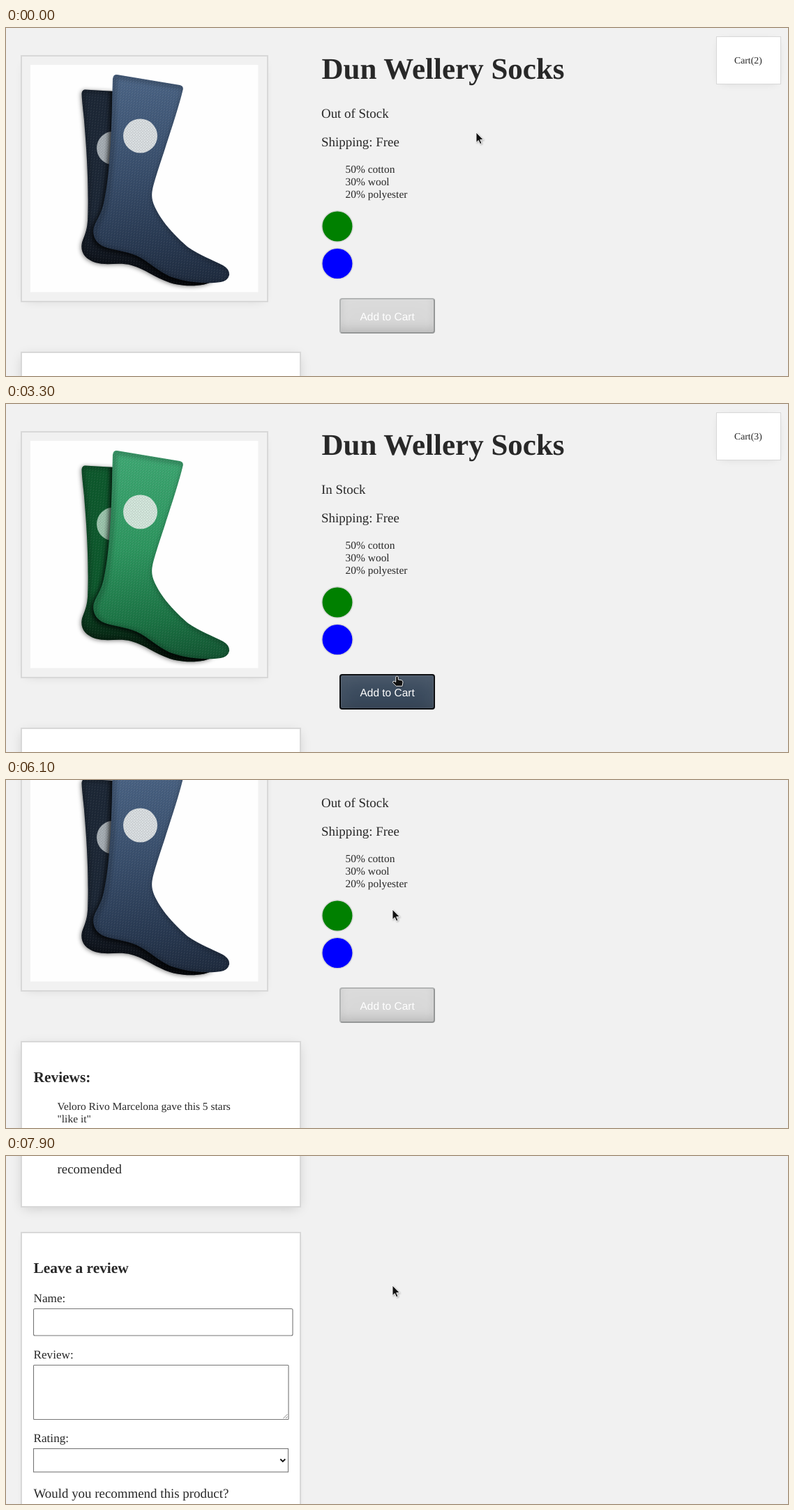
An HTML page that plays this animation: 1121 px wide and 500 px high, repeating every 8000 ms.

```html
<!DOCTYPE html>
<html lang="en">
<head>
<meta charset="utf-8">
<title>Sock shop</title>
<style>
  html, body { margin: 0; width: 100%; height: 100%; overflow: hidden; background: #f1f1f1; }
  #stage { position: relative; width: 1121px; height: 500px; overflow: hidden; background: #f1f1f1; }
  #page { position: absolute; left: 0; top: 0; width: 1121px; height: 1200px; }
  #page > * { position: absolute; box-sizing: border-box; }
  #art { left: 0; top: 0; }

  .card { background: #fff; border: 2px solid #d8d8d8; }
  .cart { left: 1018px; top: 12px; width: 93px; height: 69px; border-width: 1px; box-shadow: 0 2px 13px -7px rgba(0,0,0,.2); }
  .photo { left: 21px; top: 39px; width: 355px; height: 355px; background: #f1f1f1; box-shadow: 0 4px 14px -8px rgba(0,0,0,.16); }
  .reviews { left: 21px; top: 465px; width: 402px; height: 207px; box-shadow: 0 4px 17px -4px rgba(0,0,0,.18); }
  .form { left: 21px; top: 707px; width: 402px; height: 520px; box-shadow: 0 2px 10px -7px rgba(0,0,0,.3); }

  .button {
    left: 478px; top: 388px; width: 137px; height: 51px;
    border: 2px solid; border-radius: 4px; font-size: 15.48px;
    border-color: #b2b4b4 #959797 #959797 #b2b4b4; background: #d8d8d8;
    box-shadow: inset 0 -.6em 1em -.35em rgba(0,0,0,.17),
      inset 0 .6em 2em -.3em rgba(255,255,255,.15),
      inset 0 0 0 .05em rgba(255,255,255,.12);
  }
  .green .button { background-color: #39495c; border-color: #636b74 #15181c #15181c #636b74; }
  .green.focus .button { border-color: #0c0e11; }
  .green.press .button { border-color: #0c0e11 #39424d #39424d #0c0e11; }

  #stage { --top: #4e688a; --mid: #3a506e; --foot: #293a53; --toe: #202d41;
           --back: #1d2837; --deep: #090c12; --badge: #dce1e4; --backBadge: #a9b1b7; }
  #stage.green { --top: #41ad77; --mid: #2f9a62; --foot: #1c7646; --toe: #145a35;
                 --back: #0e5b2e; --deep: #04170b; --badge: #d5e9de; --backBadge: #9fc9b0; }

  text { font-family: "Liberation Serif", "Times New Roman", serif; fill: #282828; text-rendering: geometricPrecision; white-space: pre; }
  .h1 { font-size: 43px; font-weight: bold; }
  .h3 { font-size: 21.4px; font-weight: bold; }
  .p { font-size: 18.92px; }
  .li { font-size: 15.48px; }
  .label { font-size: 17.2px; }
  .small { font-size: 13.76px; }
  .cta { font: 15.48px "Liberation Sans", Arial, sans-serif; fill: #fff; }
  .field { fill: #fff; stroke: #767676; stroke-width: 1.1; }
  .swatch { stroke: #d8d8d8; stroke-width: 1.5; }
  #cursor { position: absolute; left: 0; top: 0; width: 30px; height: 34px; overflow: visible;
            filter: drop-shadow(1px 1.4px 1px rgba(0,0,0,.3)); }
  #cursor path { fill: #111; stroke: #fff; stroke-width: .9; stroke-linejoin: round; }
</style>
</head>
<body>
<div id="stage">
  <div id="page">
    <div class="card cart"></div>
    <div class="card photo"></div>
    <div class="card reviews"></div>
    <div class="card form"></div>
    <div class="button"></div>

    <svg id="art" width="1121" height="1200" viewBox="0 0 1121 1200">
      <defs>
        <linearGradient id="frontFill" gradientUnits="userSpaceOnUse" x1="190" y1="70" x2="235" y2="370">
          <stop offset="0" style="stop-color:var(--top)"/>
          <stop offset=".45" style="stop-color:var(--mid)"/>
          <stop offset=".8" style="stop-color:var(--foot)"/>
          <stop offset="1" style="stop-color:var(--toe)"/>
        </linearGradient>
        <linearGradient id="backFill" gradientUnits="userSpaceOnUse" x1="0" y1="90" x2="0" y2="360">
          <stop offset="0" style="stop-color:var(--back)"/>
          <stop offset=".65" style="stop-color:var(--back)"/>
          <stop offset="1" style="stop-color:var(--deep)"/>
        </linearGradient>
        <pattern id="knit" width="4" height="4" patternUnits="userSpaceOnUse" patternTransform="rotate(6)">
          <path d="M.5 0V2.6M2.5 2V4.6" stroke="#000" stroke-opacity=".18" stroke-width=".9"/>
          <path d="M1.5 1V3" stroke="#fff" stroke-opacity=".12" stroke-width=".8"/>
        </pattern>
        <path id="front" d="M159 67 L249 82 Q255 83.500 253.500 89 C248 112 238 142 229 170 C222 192 213 218 210 232
          C207 246 212 256 221 271 C232 288 246 302 261 315 C277 326 297 334 311 341 Q321 347 320 355
          Q318 363 308 365 C288 368 259 366 235 357 C216 348 204 335 187 327 C171 320 152 319 140 314
          C128 309 123 297 126 286 C130 275 136 269 140 252 C146 225 148 195 150 166 C152 132 152 102 153 73 Q154 66 159 67Z"/>
        <path id="back" d="M113 88.500 L156 91 L170 290 L250 345 L298 363 C286 371 258 373 235 366
          C212 358 199 346 180 341 C162 336 145 342 128 337 C113 332 106 322 109 308 C112 299 116 292 117 277
          C119 235 116 180 113 146 C112 126 109 110 108.500 94 Q109 89 113 88.500Z"/>
        <clipPath id="frontClip"><use href="#front"/></clipPath>
        <clipPath id="backClip"><use href="#back"/></clipPath>
        <filter id="soft" x="-20%" y="-20%" width="140%" height="140%"><feGaussianBlur stdDeviation="3"/></filter>
      </defs>

      <rect x="35" y="53" width="326.500" height="326.500" fill="#fefefe"/>
      <use href="#back" transform="translate(-1 1)" filter="url(#soft)" opacity=".5"/>
      <use href="#back" fill="url(#backFill)"/>
      <g clip-path="url(#backClip)">
        <circle cx="154" cy="172.500" r="24" style="fill:var(--backBadge)"/>
        <use href="#back" fill="url(#knit)"/>
        <use href="#back" fill="none" stroke="#000" stroke-width="6" stroke-opacity=".3" filter="url(#soft)"/>
        <use href="#front" transform="translate(-3 3)" filter="url(#soft)" opacity=".75"/>
      </g>
      <use href="#front" fill="url(#frontFill)"/>
      <g clip-path="url(#frontClip)">
        <use href="#front" transform="translate(2 2)" fill="none" stroke="#000" stroke-width="6" stroke-opacity=".25" filter="url(#soft)"/>
        <circle cx="192.500" cy="155" r="24.500" style="fill:var(--badge)"/>
        <use href="#front" fill="url(#knit)"/>
      </g>

      <text class="small" x="1044" y="51" id="cart">Cart(2)</text>
      <text class="h1" x="452.500" y="73">Dun Wellery Socks</text>
      <text class="p" x="452" y="129" id="stock">Out of Stock</text>
      <text class="p" x="452" y="170">Shipping: Free</text>
      <text class="li" x="486.500" y="207.500">50% cotton</text>
      <text class="li" x="486.500" y="225.500">30% wool</text>
      <text class="li" x="486.500" y="243.500">20% polyester</text>
      <circle class="swatch" cx="475" cy="285" r="22.200" fill="green"/>
      <circle class="swatch" cx="475" cy="338.500" r="22.200" fill="blue"/>
      <text class="cta" x="507.500" y="420">Add to Cart</text>

      <text class="h3" x="39.500" y="524">Reviews:</text>
      <text class="li" x="73.500" y="564">Veloro Rivo Marcelona gave this 5 stars</text>
      <text class="li" x="73.500" y="582">"like it"</text>
      <text class="p" x="73.500" y="623">recomended</text>

      <text class="h3" x="39.500" y="766">Leave a review</text>
      <text class="label" x="39.500" y="808">Name:</text>
      <rect class="field" x="39.500" y="817.500" width="371.500" height="38.500" rx="2"/>
      <text class="label" x="39.500" y="889">Review:</text>
      <rect class="field" x="39.500" y="898.500" width="365.500" height="78" rx="1"/>
      <path d="M397.500 975L403.500 969M401 975L403.500 972.500" stroke="#777" stroke-width=".9"/>
      <text class="label" x="39.500" y="1009">Rating:</text>
      <rect class="field" x="39.500" y="1018.500" width="365" height="33.500"/>
      <path d="M393.300 1033.500L396.800 1037L400.300 1033.500" fill="none" stroke="#111" stroke-width="1.800"/>
      <text class="p" x="39.500" y="1088.500">Would you recommend this product?</text>
    </svg>
  </div>
  <svg id="cursor">
    <path id="arrow" d="M0 0V14.500L3.300 11.500L5.600 16.700L8 15.600L5.700 10.600H10.300Z"/>
    <path id="hand" d="M-1.800 1.200Q0 -1 1.800 1.200V5L6.500 5.800Q8.700 6.500 8.500 9L7.500 14.300H-1.200L-6 9.300Q-6.200 6.800 -3.800 7.300L-1.800 8.500Z"/>
  </svg>
</div>
<script>
const LOOP = 8000, STEP = 100;
const el = id => document.getElementById(id);
const stage = el('stage');

// time, x, y
const path = [
  [0, 674, 150], [400, 515, 262], [600, 484, 284], [800, 484, 284],
  [1100, 482, 334], [1200, 482, 334], [1500, 483, 277], [1600, 483, 277],
  [1800, 480, 301], [1900, 480, 301], [2000, 478, 302], [2100, 476, 298],
  [2400, 500, 285], [2800, 500, 285], [2900, 540, 350], [3000, 560.5, 391],
  [4100, 560.5, 391], [4500, 488, 336], [4600, 487, 335], [4900, 559.5, 275.5],
  [5000, 560, 274], [5800, 554, 186]
];

// wheel offsets, one per step
const SCROLL_START = 5900;
const scroll = [6, 50, 90, 104, 134, 170, 198, 208, 208, 214, 300, 388, 400, 400, 400, 406, 492, 578, 592, 592, 598];

const within = (t, from, to) => t >= from && t < to;

function pointAt(t) {
  const i = path.findIndex(key => key[0] > t);
  if (i < 0) return path[path.length - 1].slice(1);
  const [t0, x0, y0] = path[i - 1], [t1, x1, y1] = path[i];
  const k = (t - t0) / (t1 - t0);
  return [x0 + (x1 - x0) * k, y0 + (y1 - y0) * k];
}

function render(time) {
  const t = Math.floor(time / STEP) * STEP;
  const green = within(t, 500, 1000) || within(t, 1400, 4500);
  stage.classList.toggle('green', green);
  stage.classList.toggle('focus', t >= 3300);
  stage.classList.toggle('press', t === 3900);
  el('stock').textContent = green ? 'In Stock' : 'Out of Stock';
  el('cart').textContent = `Cart(${t < 3300 ? 2 : t < 3900 ? 3 : 4})`;

  const y = t < SCROLL_START ? 0 : scroll[(t - SCROLL_START) / STEP];
  el('page').style.transform = `translateY(${-y}px)`;

  const [cx, cy] = pointAt(t);
  const hand = within(t, 3000, 4200);
  el('cursor').style.transform = `translate(${cx}px, ${cy}px)`;
  el('arrow').style.display = hand ? 'none' : '';
  el('hand').style.display = hand ? '' : 'none';
}

const start = performance.now();
function tick() {
  render((performance.now() - start) % LOOP);
  requestAnimationFrame(tick);
}
tick();
</script>
</body>
</html>
```
